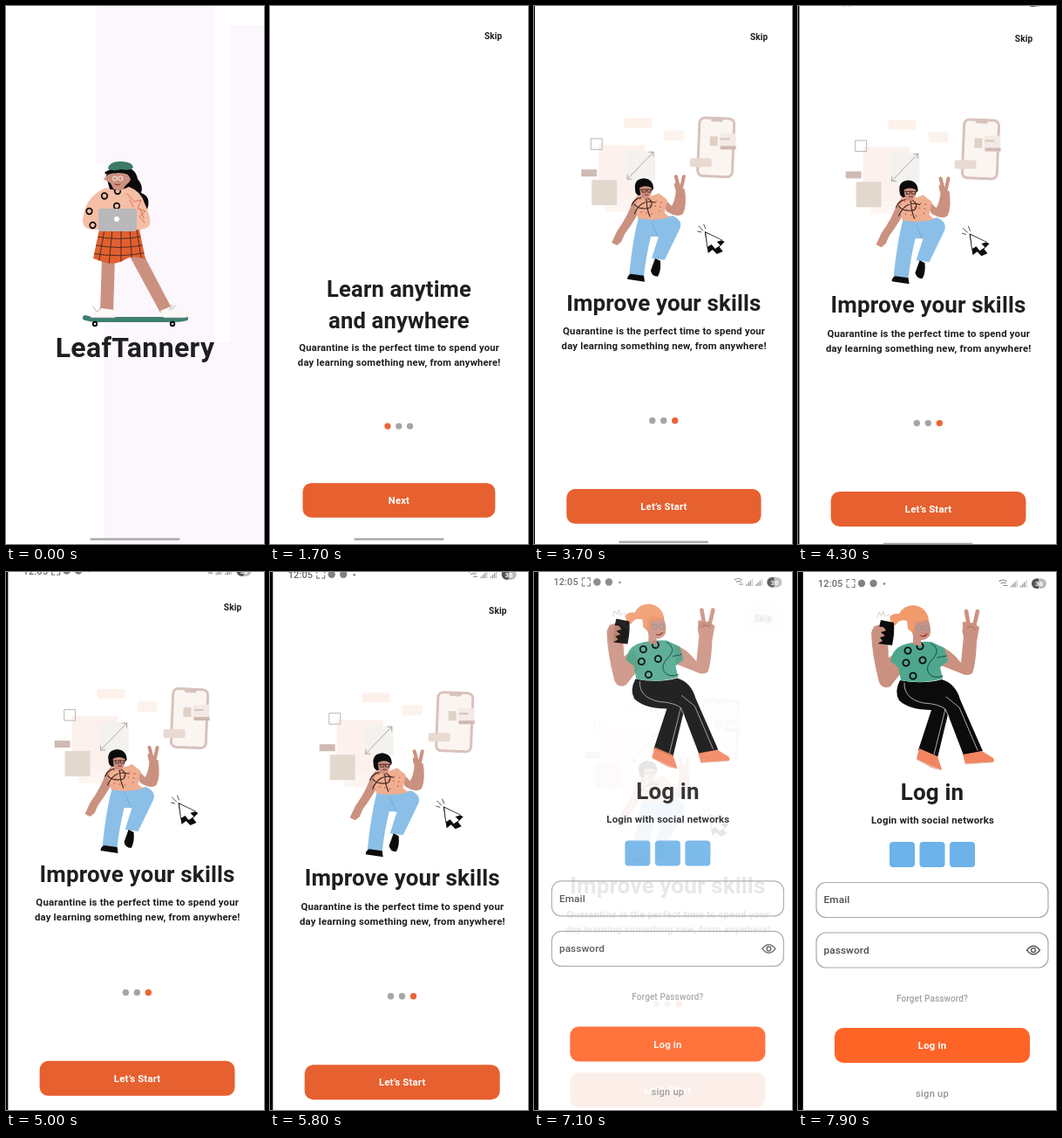
Write an HTML page with a canvas that moves like this. It is 296x616 px and loops after 8 s.

```html
<!DOCTYPE html>
<html lang="en">
<head>
<meta charset="utf-8">
<title>Onboarding</title>
<style>
html, body { margin: 0; width: 100%; height: 100%; overflow: hidden; background: #fff; }
canvas { display: block; width: 296px; height: 616px; }
</style>
</head>
<body>
<canvas id="stage"></canvas>
<script>
const W = 296, H = 616, LOOP = 8000;
const canvas = document.getElementById('stage');
const ctx = canvas.getContext('2d');
const dpr = window.devicePixelRatio || 1;
canvas.width = W * dpr;
canvas.height = H * dpr;

const INK = '#1f1f21', ORANGE = '#e7602f', SKIN = '#cb9180', BLACK = '#0b0b0c';

// time, scale, x, y, dark edge width, home bar y
const CAMERA = [
  [0, .986, -2.9, -17.8, 0, 610.5],
  [1700, .986, -2.9, -17.8, 0, 610.5],
  [2800, .993, -3.9, -19.6, .3, 610.5],
  [4300, .999, -3.3, -15.4, 1.5, 616],
  [5800, 1, -1.3, -7.8, 3.3, 623],
  [6600, 1, 0, 0, 4.8, 631],
  [7900, 1, 1, 2.5, 5.8, 634],
  [8000, 1, 1, 2.5, 5.8, 634]
];

const clamp = v => Math.max(0, Math.min(1, v));
const ramp = (t, a, b) => {
  const k = clamp((t - a) / (b - a));
  return k * k * (3 - 2 * k);
};

function cameraAt(t) {
  const i = Math.max(1, CAMERA.findIndex(k => k[0] >= t));
  const a = CAMERA[i - 1], b = CAMERA[i];
  const k = (t - a[0]) / (b[0] - a[0]);
  return a.map((v, n) => v + (b[n] - v) * k);
}

function fill(color, d) {
  ctx.fillStyle = color;
  ctx.fill(new Path2D(d));
}

function line(color, width, d) {
  ctx.strokeStyle = color;
  ctx.lineWidth = width;
  ctx.lineCap = ctx.lineJoin = 'round';
  ctx.stroke(new Path2D(d));
}

function rect(color, x, y, w, h, r = 0) {
  ctx.fillStyle = color;
  ctx.beginPath();
  ctx.roundRect(x, y, w, h, r);
  ctx.fill();
}

function frame(color, width, x, y, w, h, r = 0) {
  ctx.strokeStyle = color;
  ctx.lineWidth = width;
  ctx.beginPath();
  ctx.roundRect(x, y, w, h, r);
  ctx.stroke();
}

function oval(color, x, y, rx, ry = rx, turn = 0) {
  ctx.fillStyle = color;
  ctx.beginPath();
  ctx.ellipse(x, y, rx, ry, turn, 0, 7);
  ctx.fill();
}

function rings(points, r, width, color = BLACK) {
  ctx.strokeStyle = color;
  ctx.lineWidth = width;
  for (const [x, y] of points) {
    ctx.beginPath();
    ctx.arc(x, y, r, 0, 7);
    ctx.stroke();
  }
}

// y is the middle of the capitals
function text(str, x, y, size, o = {}) {
  ctx.font = `${o.weight || 700} ${size}px Roboto, Arial, sans-serif`;
  ctx.letterSpacing = (o.gap ?? .18) + 'px';
  ctx.textAlign = o.align || 'center';
  ctx.fillStyle = o.color || INK;
  ctx.fillText(str, x, y + size * .355);
}

const title = (str, y, x = 153) => text(str, x, y, 26, { gap: .15 });

function button(label, x, y, color) {
  rect(color, x, y, 224, 40, 10);
  text(label, x + 112, y + 20, 11.4, { color: '#fff' });
}

function skater() {
  // board
  line('#3d7f71', 6, 'M91 357Q97 359 104 359H192Q201 359 206 357.5');
  rings([[102, 364], [191, 364]], 2.2, 2);
  // legs and shoes
  fill(SKIN, 'M110 288H125L123 351H108Z');
  fill(SKIN, 'M141 285L157 283L190 346L177 351Z');
  fill('#faf7f5', 'M110 346L124 348L125 357H97Q99 351 110 346Z');
  fill('#faf7f5', 'M177 349L189 344L208 353Q210 357 204 357H181Z');
  line('#8f8b8b', .6, 'M97 357H125M181 357H207M104 350L100 344M105 350L109 345M188 348L190 342M190 348L194 343');
  // hair behind
  fill(BLACK, 'M115 195Q116 184 132 183Q149 185 151 198Q158 206 155 214Q167 218 162 233L144 226L119 210Z');
  // jumper
  fill('#f5bea6', 'M115 208Q126 214 141 207Q155 212 159 226Q170 249 162 254Q154 257 146 256H105Q88 257 88 246Q90 218 115 208Z');
  line('#dc6a55', .9, 'M139 215L147 224L155 222L151 232L160 235L153 241L159 248M142 222L146 230M154 232L158 243');
  rings([[113, 217.5], [128, 212], [95.5, 235], [99.5, 251], [127, 229]], 3.3, 1.7);
  // head
  fill(SKIN, 'M117 193Q128 189 141 193L145 196L141 202Q137 205 134 210Q128 213 123 209L120 203L112 198Z');
  line(BLACK, 3, 'M115 191Q119 188 126 190M138 190Q145 194 145 203');
  rings([[125, 197.5], [131.5, 197.5]], 2.5, 1, '#f5efe8');
  line('#8c2a24', 1, 'M125 204Q128 206 131 204');
  fill('#3c7a65', 'M117 186Q119 177 133 178Q146 179 146 185Q142 189 132 187Q121 190 117 186Z');
  // skirt
  ctx.save();
  const skirt = 'M107 256H153L160 290Q147 285 139 289Q127 297 114 294L100 289Z';
  fill('#e2602f', skirt);
  ctx.clip(new Path2D(skirt));
  line('#402621', .9, 'M113 256L106 295M122 256L118 297M132 256V297M142 256L145 297M150 256L156 295M98 263Q130 270 160 263M98 273Q130 280 162 273M98 283Q130 289 163 282');
  ctx.restore();
  rect('#b9b8ba', 106, 232, 44, 26, 3);
  oval('#fff', 127, 244, 3);
}

function splash() {
  rect('#fff', 0, 0, W, H);
  rect('#fcf6fd', 104, 0, 136, 180);
  rect('#fcf6fd', 112, 180, 128, 436);
  rect('#fcf6fd', 257, 22, 39, 594);
  rect('#fcf6fd', 240, 385, 17, 231);
  skater();
  text('LeafTannery', 148, 391, 32, { gap: .35 });
}

function phoneScene() {
  // pale backdrop
  rect('#fcf1ec', 78, 177, 53, 63);
  rect('#fdf5f1', 86, 239, 32, 15);
  rect('#fdf1ea', 107, 146, 32, 11, 2);
  rect('#fdf3ee', 153, 160, 23, 12, 2);
  rect('#f4f2ef', 110, 184, 33, 34);
  rect('#e3d8ce', 70, 217, 29, 29);
  rect('#d0bab5', 58, 205, 18, 8);
  frame('#b8b5b4', 1, 69.5, 169.5, 12.5, 12.5);
  line('#a9a6a5', 1, 'M111 216L141 185M111 211V216H116M136 185H141V190');
  // phone
  ctx.save();
  ctx.translate(213, 179);
  ctx.rotate(.04);
  rect('#fbf5f2', -20, -33, 40, 67, 6);
  frame('#d8c2bc', 3, -20, -33, 40, 67, 6);
  rect('#d8c2bc', -7, -33, 14, 4, 2);
  ctx.restore();
  rect('#dfd1c6', 206, 167, 9, 11);
  rect('#f4eae5', 217, 164, 19, 18, 1);
  rect('#d8c4bd', 218, 169, 11, 2);
  rect('#cfb9b2', 218, 178, 18, 4);
  rect('#e8dad1', 183, 192, 25, 10, 2);
  // arms
  fill(SKIN, 'M123 235L129 244Q121 262 108 279L104 288L99 292L93 289L99 276Q112 258 117 242Z');
  fill(SKIN, 'M150 235L162 247Q166 241 167 228L177 227Q180 246 175 256Q168 261 156 253Z');
  line(SKIN, 4, 'M171 228L167 213M173 227L176 213M168 227L167 222');
  // trousers
  fill('#8bbfe7', 'M124 260Q145 263 163 258Q176 264 171 274L154 309L139 307L147 282H138Q132 307 130 328L113 327Q117 286 124 260Z');
  line('#6fa5d0', .8, 'M139 266L146 282');
  fill(BLACK, 'M115 325L130 327L131 334L111 331Q111 327 115 325Z');
  fill(BLACK, 'M143 307L149 310Q150 322 146 328Q139 328 138 321Z');
  // top
  fill('#f0ae90', 'M124 234Q136 238 147 232L157 240L154 255L160 260Q141 265 123 261L120 247Z');
  for (let i = 0; i < 14; i++) {
    oval('#b4533d', 126 + (i * 11) % 27, 239 + (i * 7) % 20, .8);
  }
  line('#38231f', 1.1, 'M116 246Q120 236 133 237Q143 243 137 249Q125 252 119 245M119 256Q127 238 143 243M133 238Q133 250 137 259');
  // head
  fill(BLACK, 'M120 228Q118 216 130 215Q141 216 141 227L138 231L124 235Q120 233 120 228Z');
  fill(SKIN, 'M125 226Q132 222 139 226Q140 233 136 236L134 239L127 238L126 233Z');
  line('#4a2520', .9, 'M126 228H139M128 228V231H132V228M134 228V231H138V228');
  line('#8c2a24', 1, 'M131 234L135 234');
  // pointer
  fill(BLACK, 'M200 276L204 301L209 297L214 302L221 299L217 294L223 288Z');
  fill('#fff', 'M201 277L220 286L214 288L218 292L212 296L208 291L203 294Z');
  line(BLACK, .7, 'M203 294L201 277L220 286');
  line('#3b3b3b', .9, 'M193 270L198 275M199 268L201 273M192 276L196 277');
}

function selfie() {
  // raised right arm
  fill(SKIN, 'M160 84Q175 88 187 104L190 74Q187 66 190 60L200 58L208 63L205 80Q204 106 200 116Q194 120 187 116L164 107Z');
  line(SKIN, 4.6, 'M196 62L193 45M202 62L206 45M192 64L191 59');
  line('#8e5c50', .7, 'M194 64Q199 60 203 66');
  // phone arm
  fill(SKIN, 'M84 70Q86 60 96 60L109 68Q110 76 103 82L104 98L116 91L122 111L106 131Q97 135 93 126Q85 96 84 70Z');
  // trousers
  fill(BLACK, 'M117 124Q143 129 165 123Q181 128 186 146L212 205L190 210L172 163L160 213L138 204L153 158Q128 158 116 147Q110 137 117 124Z');
  line('#d7d4d3', .8, 'M122 127Q121 145 144 150Q162 151 169 157L156 209M169 157L173 166M170 143L185 155L206 204');
  // shoes
  fill('#f2855f', 'M139 202L160 211L165 226Q157 228 136 214Z');
  fill('#f2855f', 'M189 209L211 205L224 213Q227 218 221 218L192 220Z');
  line('#e3d5cf', 1, 'M136 215L164 227M192 220L224 218');
  // shirt
  fill('#4ea68e', 'M119 84Q134 79 153 80L168 87L172 102L163 109L166 122Q143 129 118 124L115 109L106 102Q108 89 119 84Z');
  rings([[140, 85], [126, 90], [143, 101], [124, 104], [132, 119]], 3.6, 1.9);
  line('#174d41', 1, 'M153 82Q164 88 156 98Q145 108 150 116Q156 123 166 119M160 98L170 96');
  // head
  fill(SKIN, 'M133 52L149 53Q154 66 151 73Q147 78 141 78L142 85L132 83L132 73Q128 63 133 52Z');
  fill('#f19a6c', 'M116 48Q121 38 133 38Q147 40 150 54Q142 58 135 57L132 70L126 65L125 56Q119 54 115 57Q111 64 104 62Q108 57 105 52Q109 47 116 48Z');
  rings([[139, 64], [147, 64]], 3, .9, '#8795a7');
  line('#9c362c', 1.3, 'M141 73Q145 75 148 71');
  // handset
  fill(BLACK, 'M95 55L110 58Q111 70 108 84L92 82Q91 70 95 55Z');
  fill(SKIN, 'M87 62L98 63L101 67L95 69L100 73L94 75L97 79L91 82L86 78Z');
  line('#c9c2be', .8, 'M91 52L93 46L96 50L98 45L100 51M102 50Q105 47 106 51');
}

function statusBar() {
  const gray = '#828282';
  text('12:05', 22, 10.5, 11, { align: 'left', weight: 500, gap: .1, color: '#6a6a6a' });
  line(gray, 1.2, 'M55 9V6H58M61 6H64V9M64 12V15H61M58 15H55V12');
  oval(gray, 72, 10.5, 4.2);
  oval(gray, 85.5, 10.5, 4.2);
  oval(gray, 98, 11, 1.3);
  line(gray, 1.1, 'M230 8Q234 5 238 8M232 10.5Q234.5 8.5 237 10.5M235 13H239');
  for (const x of [243, 254]) {
    for (let i = 0; i < 4; i++) rect(i < 3 ? '#999' : '#ccc', x + i * 2.1, 13 - i * 2, 1.4, 2 + i * 2);
  }
  rect('#bbb', 267, 5, 17, 11.5, 5.7);
  rect('#555', 267, 5, 8, 11.5, [5.7, 0, 0, 5.7]);
  text('38', 275.5, 10.7, 8, { color: '#fff', gap: 0 });
}

const PAGES = [
  { head: ['Learn anytime', 'and anywhere'], label: 'Next' },
  { head: ['Find a course', 'for you'], label: 'Next' },
  { head: ['Improve your skills'], label: 'Let’s Start' }
];

function intro(index, t) {
  const page = PAGES[index], last = index === 2;
  rect('#fff', -10, -10, W + 30, H + 60);
  if (last) {
    statusBar();
    ctx.save();
    ctx.globalAlpha *= ramp(t, 6350, 6550);
    rect('#e4e9eb', 240, 38, 46, 29, 14.5);
    ctx.restore();
    ctx.save();
    ctx.globalAlpha *= ramp(t, 3150, 3500);
    phoneScene();
    ctx.restore();
  }
  text('Skip', 262.6, 52.5, 10.2, { gap: .1 });
  page.head.forEach((s, i) => title(s, (last ? 358 : 346.5) + i * 36.3));
  const y = last ? 390.5 : 414.8;
  text('Quarantine is the perfect time to spend your', 153.2, y, 11.4);
  text('day learning something new, from anywhere!', 153.2, y + 17, 11.4);
  for (let i = 0; i < 3; i++) {
    oval(i === index ? '#ec6537' : '#a5a5a7', 139.8 + i * 13, last ? 493.5 : 506, 3.7);
  }
  button(page.label, 41, 572, ORANGE);
  if (index === 1 && t > 2650) {
    const grow = ramp(t, 2800, 3150);
    ctx.save();
    ctx.beginPath();
    ctx.roundRect(41, 572, 224, 40, 10);
    ctx.clip();
    ctx.globalAlpha *= 1 - grow * .8;
    oval('rgba(240,150,125,.6)', 95.5, 598, 5.5 * ramp(t, 2650, 2800) + grow * 110);
    ctx.restore();
  }
}

function login() {
  rect('#fff', -10, -10, W + 30, H + 60);
  statusBar();
  ctx.translate(-1, -2.5);
  selfie();
  title('Log in', 252, 154);
  text('Login with social networks', 154.5, 284, 11.4);
  for (let i = 0; i < 3; i++) rect('#6db2e8', 105 + i * 34.5, 309, 29, 29, 4);
  frame('#a9a9a9', 1.2, 21, 355.5, 266, 40, 11);
  frame('#a9a9a9', 1.2, 21, 413, 266, 40, 11);
  const field = { align: 'left', weight: 500, gap: .1, color: '#4c4c4f' };
  text('Email', 29.5, 375, 11.8, field);
  text('password', 29.5, 432.5, 11.8, field);
  line('#555', 1.3, 'M262.5 433Q270 423.5 277.5 433Q270 442.5 262.5 433Z');
  rings([[270, 433]], 2.4, 1.4, '#555');
  text('Forget Password?', 154, 488, 10, { weight: 500, gap: .1, color: '#a2a2a2' });
  button('Log in', 42, 522, '#ff6427');
  text('sign up', 154, 597, 11.2, { weight: 500, gap: .2, color: '#949494' });
}

function layer(alpha, cam, paint) {
  if (alpha <= 0) return;
  ctx.save();
  ctx.globalAlpha = alpha;
  if (cam) {
    ctx.translate(cam[2], cam[3]);
    ctx.scale(cam[1], cam[1]);
  }
  paint();
  ctx.restore();
}

function draw(t) {
  const cam = cameraAt(t);
  ctx.setTransform(dpr, 0, 0, dpr, 0, 0);
  rect('#fff', 0, 0, W, H);
  if (t < 1400) layer(1, null, splash);
  if (t < 2300) layer(ramp(t, 1100, 1400), cam, () => intro(0, t));
  if (t < 3250) layer(ramp(t, 2150, 2300), cam, () => intro(1, t));
  if (t < 7150) layer(ramp(t, 3100, 3250), cam, () => intro(2, t));
  layer(ramp(t, 6900, 7150), cam, login);
  rect('#a9a9ab', 96.5 + cam[4] * .7, cam[5] - 1.3, 103, 2.6, 1.3);
  if (t > 2500 && t < 3200) {
    rect('#f0f0f0', 0, 0, 1, H);
    rect('#f0f0f0', 295, 0, 1, H);
  }
  rect('#000', 0, 0, cam[4], H);
}

function tick(now) {
  draw(now % LOOP);
  requestAnimationFrame(tick);
}
draw(0);
requestAnimationFrame(tick);
</script>
</body>
</html>
```
